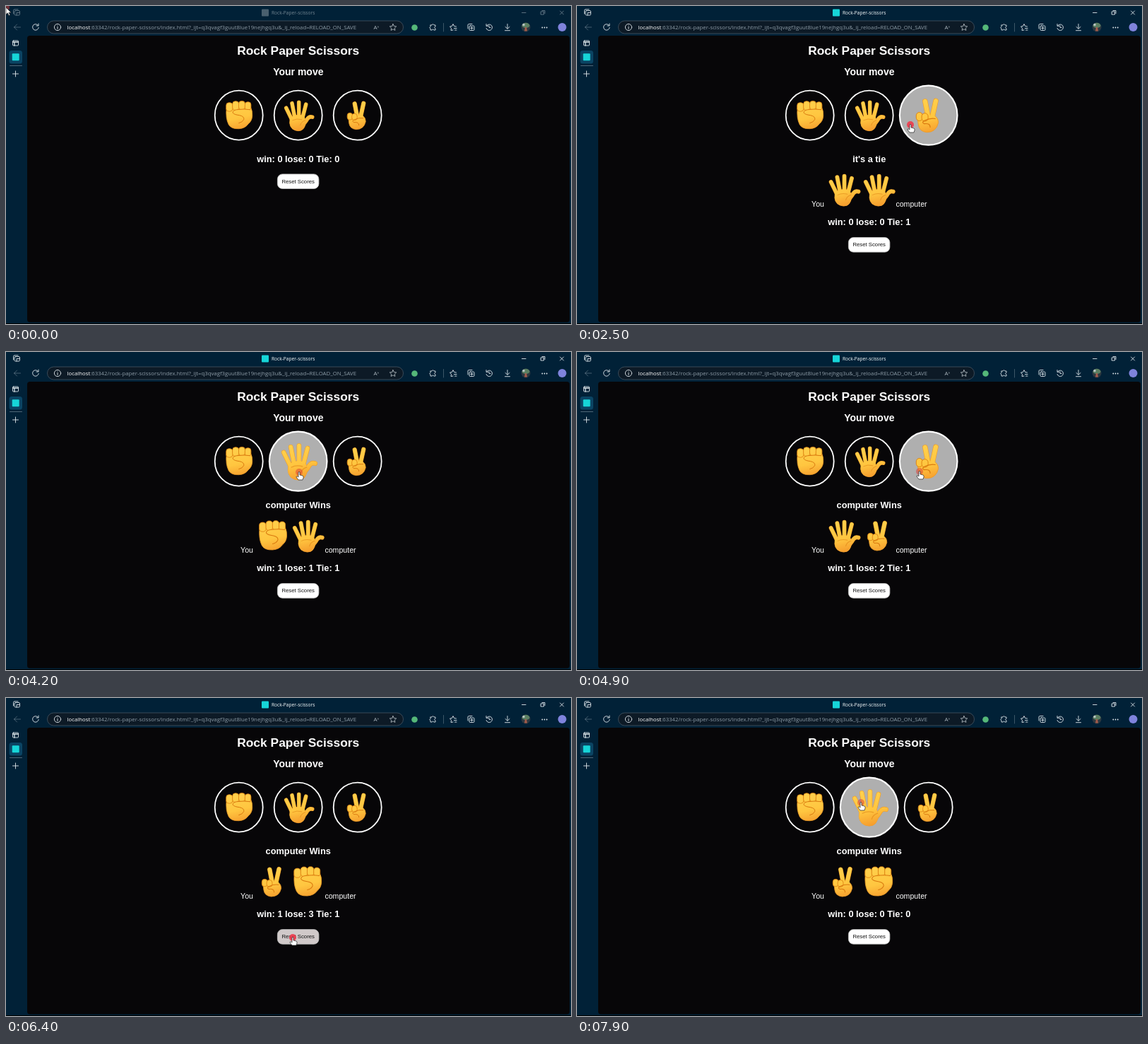
An HTML page that plays this animation: 800x450 px, repeating every 8000 ms.

```html
<!DOCTYPE html>
<html lang="en">
<head>
<meta charset="utf-8">
<title>Rock-Paper-scissors</title>
<style>
html, body { margin: 0; width: 100%; height: 100%; overflow: hidden; background: #012137; }
svg { display: block; width: 800px; height: 450px; }
.ui { font-family: "Open Sans", "Noto Sans", sans-serif; }
.page { font-family: "Liberation Sans", Arial, sans-serif; fill: #fff; text-anchor: middle; }
.bold { font-weight: 700; }
.line { fill: none; stroke: #dfe6ea; stroke-width: .9; stroke-linecap: round; stroke-linejoin: round; }
.edge { fill: none; stroke: #ee9c28; stroke-linecap: round; stroke-linejoin: round; }
.skin { fill: none; stroke: url(#skin); stroke-linecap: round; stroke-linejoin: round; }
.crease { fill: none; stroke: #d9790f; stroke-width: 1; stroke-linecap: round; }
</style>
</head>
<body>
<svg viewBox="0 0 800 450">
  <defs>
    <linearGradient id="skin" gradientUnits="userSpaceOnUse" x1="-4" y1="-20" x2="6" y2="22">
      <stop offset="0" stop-color="#ffd04c"/><stop offset=".55" stop-color="#ffc640"/><stop offset="1" stop-color="#f59a2c"/>
    </linearGradient>

    <g id="rock">
      <path d="M-17.500-10L17-11Q19.500-6 19 1Q18.500 8 13.500 12Q9 18.500 0 19Q-11 19.500-14.500 13Q-19 4-17.500-10Z" fill="url(#skin)" stroke="#ee9c28" stroke-width=".8"/>
      <g fill="url(#skin)" stroke="#dd8110" stroke-width=".8">
        <rect x="-18" y="-18" width="9.200" height="12.500" rx="4"/>
        <rect x="-9" y="-20" width="9" height="13" rx="4"/>
        <rect x="-.2" y="-20.300" width="9" height="12.500" rx="4"/>
        <rect x="8.600" y="-19" width="8.600" height="12" rx="4"/>
      </g>
      <path d="M17.500-8Q8-9.500-3-8Q-9-7-8.500-3.500Q-7-1 2 .5Q8 2 7 7L17 5Z" fill="url(#skin)"/>
      <path class="crease" d="M16-8Q8-9.500-3-8Q-9-7-8.500-3.500Q-7-1 1 0Q8 1.500 7 6Q5 10 0 11"/>
    </g>

    <path id="fingers" d="M-9 6L-17-10.500M-5 2L-8.700-17M1 2L1-18.500M6 4L11-15.500M5 15Q11 9 13 5Q16 1 20 2.500"/>
    <path id="palm" d="M-11.500 4Q-2-3 8 1L11 8Q10 22 0 22Q-11 21-12 11Z"/>
    <g id="paper">
      <use href="#fingers" class="edge" stroke-width="5.600"/>
      <use href="#palm" fill="url(#skin)" stroke="#ee9c28" stroke-width=".8"/>
      <use href="#fingers" class="skin" stroke-width="4.600"/>
      <use href="#palm" fill="url(#skin)"/>
      <path class="crease" d="M10 7Q4 9 3 14M-8 7Q-2 4 5 6" opacity=".5"/>
    </g>

    <path id="vee" d="M0 4L-4-16.500M4 4L8.600-17"/>
    <g id="scissors">
      <use href="#vee" class="edge" stroke-width="6.200"/>
      <path d="M-13 2Q-5-1 7 0Q12 4 11.500 9Q9 20-2 20Q-11 19-12 11Z" fill="url(#skin)" stroke="#ee9c28" stroke-width=".8"/>
      <use href="#vee" class="skin" stroke-width="5.200"/>
      <g fill="url(#skin)" stroke="#dd8110" stroke-width=".8">
        <rect x="-14.500" y="-3.500" width="7.500" height="10" rx="3.700"/>
        <rect x="-8" y="-2.500" width="7.500" height="9.500" rx="3.700"/>
      </g>
      <path class="crease" d="M8 4Q2 3-4 6Q-9 8-5 10Q2 9 2 14"/>
    </g>

    <path id="hand" d="M-1 0Q0-1.200 1 0V4L5 5Q6.500 5.500 6 8L5 11H-1L-4 7Q-4 5.500-2.500 6L-1 7Z" fill="#fff" stroke="#222" stroke-width=".7"/>
    <path id="arrow" d="M0 0V10L2.400 7.800L4 11.500L5.700 10.700L4.100 7.200H7.200Z" fill="#fff" stroke="#222" stroke-width=".7"/>
  </defs>

  <rect width="800" height="449" fill="#012137"/>
  <rect y="449" width="800" height="1"/>
  <rect x="30" y="42" width="768" height="405.500" rx="4" fill="#070608"/>

  <!-- title bar -->
  <g id="bar">
    <g class="line">
      <rect x="12" y="6.500" width="7.500" height="6.500" rx="1.500"/>
      <path d="M10.500 11V6.500Q10.500 4.800 12 4.800H17M15 13V9.500H19"/>
      <path d="M730.500 9.500H736M784.500 7L789.500 12M789.500 7L784.500 12"/>
      <rect x="757.500" y="8" width="4" height="4"/><path d="M759 6.500H763V10.500"/>
    </g>
    <rect id="icon" x="362" y="4.500" width="10" height="10" rx="1"/>
    <text class="ui" x="376" y="12" font-size="6.640" fill="#fff">Rock-Paper-scissors</text>
  </g>

  <!-- toolbar -->
  <rect x="58.500" y="21" width="504" height="18" rx="9" fill="#0d1a26" stroke="#40505d" stroke-width=".9"/>
  <path class="line" opacity=".35" d="M20.500 30H11.500M15.500 26L11.500 30L15.500 34"/>
  <g class="line">
    <path d="M45.500 27.500A4.300 4.300 0 1 0 46.200 30.500M46 25V28H43"/>
    <circle cx="73" cy="30" r="4.600"/><path d="M73 29.500V32.500M73 27.700V27.800"/>
    <path d="M548 25.500L549.400 28.500L552.700 28.900L550.300 31.200L550.900 34.400L548 32.800L545.100 34.400L545.700 31.200L543.300 28.900L546.600 28.500Z" opacity=".75"/>
    <path d="M601 27H603Q604.500 24 606 27H608V29Q605 30.500 608 32V34H606Q604.500 32 603 34H601V32Q598.500 30.500 601 29Z"/>
    <path d="M619.500 24.500V36" opacity=".3"/>
    <path d="M633 34L630 34.500L630.500 31.500L628.500 29L631.500 28.500L633 25.500L634.500 28.500L637.500 29M634.500 31.500H638M635.500 34H638"/>
    <rect x="656" y="28" width="7" height="6.500" rx="1.300"/>
    <path d="M654 32V27Q654 25.500 655.500 25.500H660M659.500 29.500V33M657.700 31.200H661.300"/>
    <path d="M680.500 28A4.300 4.300 0 1 1 680 31.500M680 25.500V28.300H683M684 28V30.500H686"/>
    <path d="M710 25.500V32M707 29.500L710 32.300L713 29.500M706.500 34.700H713.500"/>
  </g>
  <g class="ui" font-size="7.810">
    <text x="86.500" y="32.800" fill="#8d9ca7"><tspan fill="#fff">localhost</tspan>:63342/rock-paper-scissors/index.html?_ijt=q3qvagf3guut8lue19nejhgq3u&amp;_ij_reload=RELOAD_ON_SAVE</text>
    <text x="520.500" y="33" font-size="8" fill="#aab6be">A<tspan font-size="5" dy="-2.500">»</tspan></text>
  </g>
  <circle cx="578.500" cy="30.500" r="4.300" fill="#55b879"/>
  <g>
    <circle cx="736" cy="30" r="6.500" fill="#2c3840"/>
    <ellipse cx="736" cy="27.500" rx="5.500" ry="3.700" fill="#5b7f62"/>
    <circle cx="733" cy="26.500" r="1.700" fill="#b9c4c4"/>
    <path d="M735 30H737L738 35.500H734Z" fill="#a35c4c"/>
  </g>
  <g fill="#e6ecef"><circle cx="759.300" cy="30.500" r=".9"/><circle cx="762.500" cy="30.500" r=".9"/><circle cx="765.700" cy="30.500" r=".9"/></g>
  <circle cx="787.500" cy="30" r="6" fill="#7f83dc"/>

  <!-- side tabs -->
  <g class="line">
    <rect x="9.500" y="49" width="8" height="7" rx="1"/><path d="M9.500 51H17.500M12 51V56" stroke-width="1.300"/>
    <path d="M5.500 84.500H22.500" opacity=".4"/>
    <path d="M13.500 92V100M9.500 96H17.500"/>
  </g>
  <rect x="4.500" y="63" width="18.500" height="18.500" rx="3.500" fill="#0b4463"/>
  <rect x="8.700" y="67.300" width="10" height="10" rx="1" fill="#16d5d8"/>

  <!-- game -->
  <g class="page">
    <text class="bold" x="413.700" y="69.300" font-size="17.400">Rock Paper Scissors</text>
    <text class="bold" x="413.800" y="97.700" font-size="14">Your move</text>
    <g id="moves"></g>
    <g id="result">
      <text id="msg" class="bold" x="413.700" y="220.800" font-size="12.800"></text>
      <text x="341" y="284" font-size="10.600">You</text>
      <use id="you" transform="translate(377.500 260) scale(1.050)"/>
      <use id="cpu" transform="translate(426.700 260) scale(1.050)"/>
      <text x="473.500" y="284" font-size="10.600">computer</text>
    </g>
    <g id="foot">
      <text id="score" class="bold" x="413.800" y="220.800" font-size="12.800"></text>
      <rect id="reset" x="384.400" y="237.900" width="58.500" height="20.600" rx="7" stroke="#c4c4c4" stroke-width=".8"/>
      <text x="413.700" y="250.800" font-size="7.750" fill="#111">Reset Scores</text>
    </g>
  </g>
  <g id="cursor"><circle id="dot" r="5"/><use id="shape"/></g>
</svg>
<script>
const $ = id => document.getElementById(id);
const names = ["rock", "paper", "scissors"];
const centers = [329.7, 413.7, 497.7], midY = 154.7;

$("moves").innerHTML = names.map(n =>
  `<g><ellipse rx="34" ry="35" stroke="#fff" stroke-width="1.800"/><use href="#${n}"/></g>`).join("");
const moves = [...$("moves").children];

// time, x, y of the pointer
const track = [
  [0, 0, 2], [800, 130, 58], [900, 330, 150], [1000, 468, 211], [1100, 424, 170],
  [2000, 442, 169], [2100, 463, 169], [2200, 472, 168],
  [3300, 395, 171], [3400, 329, 168],
  [4000, 348, 170], [4100, 392, 171], [4200, 415, 170], [4900, 485, 169],
  [5600, 480, 196], [5700, 466, 232], [5800, 446, 272], [5900, 426, 310], [6000, 412, 332], [6100, 406, 339],
  [6900, 392, 330], [7000, 370, 314], [7100, 354, 304], [7200, 372, 301],
  [7300, 408, 301], [7400, 442, 300], [7500, 476, 300], [7600, 505, 299],
  [7800, 462, 232], [7900, 402, 148]
];

// time, message, player, computer, wins, losses, ties
const rounds = [
  [0, "", "", "", 0, 0, 0],
  [1700, "it's a tie", "paper", "paper", 0, 0, 1],
  [3100, "You Wins", "scissors", "paper", 1, 0, 1],
  [3900, "computer Wins", "rock", "paper", 1, 1, 1],
  [4700, "computer Wins", "paper", "scissors", 1, 2, 1],
  [5400, "computer Wins", "scissors", "rock", 1, 3, 1],
  [6600, "computer Wins", "scissors", "rock", 0, 0, 0]
];

// spans in which the click marker is bright
const clicks = [[1500, 2000], [2500, 3300], [3600, 4000], [4600, 4900], [5100, 5600], [6400, 6700]];

const latest = (list, t) => list.findLast(e => e[0] <= t);
const within = (t, [a, b]) => t >= a && t < b;
const set = (id, attrs) => { for (const k in attrs) $(id).setAttribute(k, attrs[k]); };

function draw(t) {
  const [, x, y] = latest(track, t);
  const [, msg, you, cpu, win, lose, tie] = latest(rounds, t);
  const focus = t >= 1500;
  const pressed = clicks.some(c => within(t, c));

  set("bar", { opacity: focus ? 1 : .45 });
  set("icon", { fill: focus ? "#16d5d8" : "#a3adb4" });

  let over = false;
  moves.forEach((m, i) => {
    const hot = Math.hypot(x - centers[i], y - midY) < 37;
    over ||= hot;
    m.setAttribute("transform", `translate(${centers[i]} ${midY}) scale(${hot ? 1.2 : 1})`);
    m.firstChild.setAttribute("fill", hot ? "#afafaf" : "#070608");
  });

  $("result").style.display = msg ? "" : "none";
  $("msg").textContent = msg;
  set("you", { href: "#" + you });
  set("cpu", { href: "#" + cpu });
  $("score").textContent = `win: ${win} lose: ${lose} Tie: ${tie}`;
  set("foot", { transform: `translate(0 ${msg ? 89.7 : 0})` });
  set("reset", { fill: within(t, [6400, 6600]) ? "#d0c9c9" : "#fff" });

  over ||= x > 384 && x < 443 && y > 327 && y < 349;
  set("cursor", { transform: `translate(${x} ${y})` });
  set("dot", { fill: pressed ? "#f0384a" : "#dc3a36", opacity: pressed ? .88 : .5 });
  set("shape", { href: over ? "#hand" : "#arrow" });
}

function tick(now) {
  draw(Math.floor(now % 8000 / 100) * 100);
  requestAnimationFrame(tick);
}
tick(performance.now());
</script>
</body>
</html>
```
